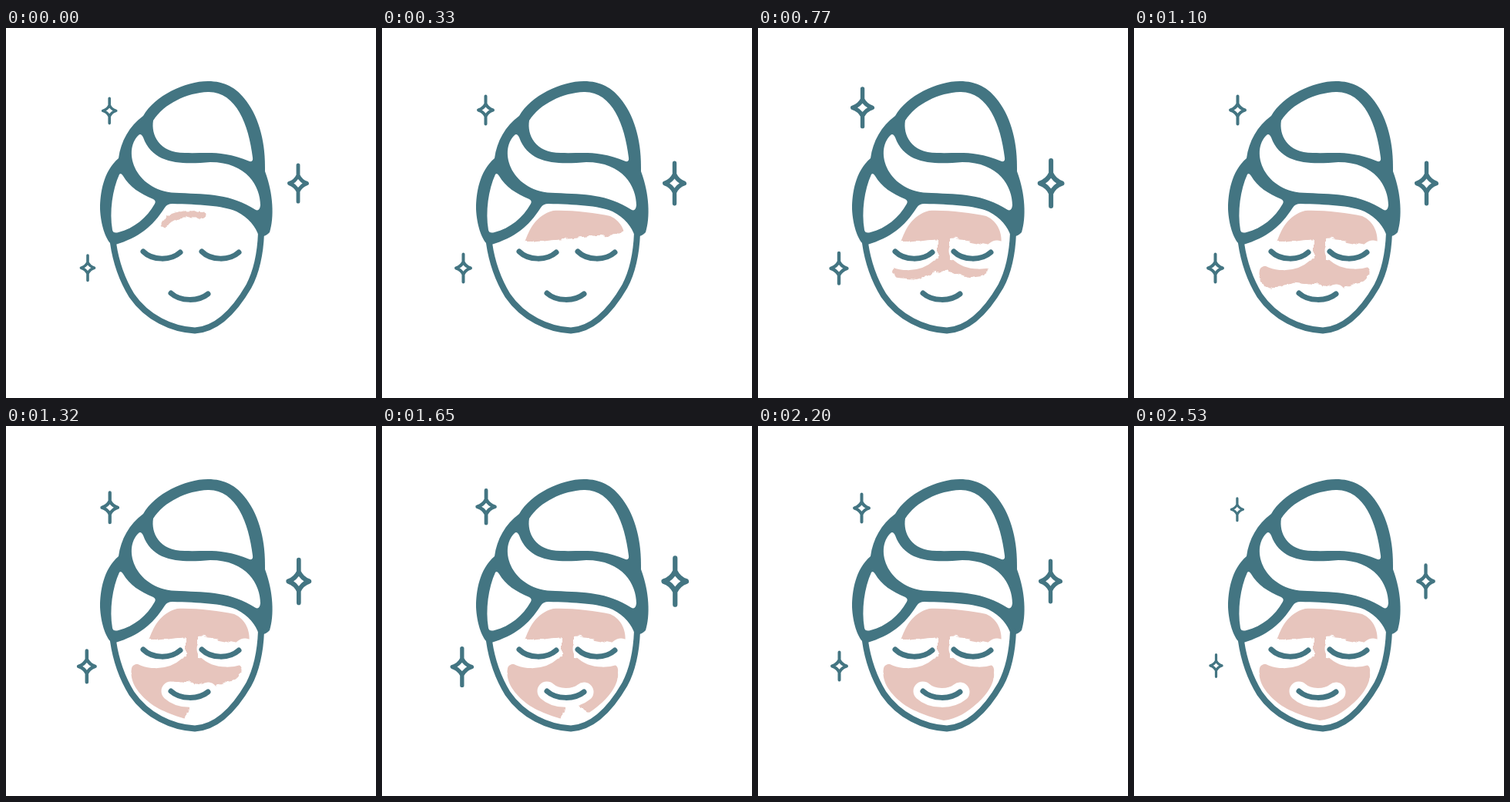
Recreate the animation shown at these times as an HTML page. Size 480 px wide and 480 px high, loop 2.64 s.

```html
<!DOCTYPE html>
<html lang="en">
<head>
<meta charset="utf-8">
<title>Face mask</title>
<style>
  html, body { margin: 0; width: 100%; height: 100%; overflow: hidden; background: #fff; }
  svg { display: block; width: 100%; height: 100%; }
  .line { fill: none; stroke: #437582; stroke-linecap: round; stroke-linejoin: round; }
  .wrap { fill: #437582; fill-rule: evenodd; }
  .cream { fill: #e7c5bd; }
  .brush { fill: none; stroke: #fff; stroke-linecap: round; stroke-linejoin: round; }
  .halo { fill: #000; stroke: #000; stroke-linecap: round; stroke-linejoin: round; }
  .star { fill: #fff; stroke: #437582; stroke-width: 4; stroke-linecap: round; stroke-linejoin: round; }
</style>
</head>
<body>
<svg viewBox="0 0 480 480">
  <defs>
    <path id="eye" d="M0 0C12 12 36 12 48 1"/>
    <path id="smile" d="M214 344C226 355 250 355 262 345"/>
    <filter id="ragged" filterUnits="userSpaceOnUse" x="0" y="0" width="480" height="480"
      color-interpolation-filters="sRGB">
      <feTurbulence type="fractalNoise" baseFrequency="0.12" numOctaves="2" seed="4"/>
      <feDisplacementMap in="SourceGraphic" scale="7" xChannelSelector="R" yChannelSelector="G"/>
    </filter>
    <!-- Brushed area, kept clear of eyes and mouth -->
    <mask id="painted" maskUnits="userSpaceOnUse" x="0" y="0" width="480" height="480">
      <g id="brushes" filter="url(#ragged)"></g>
      <g class="halo">
        <use href="#eye" x="170" y="291" stroke-width="28"/>
        <use href="#eye" x="262" y="289" stroke-width="29"/>
        <use href="#smile" fill="none" stroke-width="25"/>
      </g>
    </mask>
  </defs>

  <path class="cream" mask="url(#painted)" d="M185 278C191 262 199 243 222 237C245 236 276 240 296 244
    C312 251 318 268 315 284L298 309C305 309 307 314 306 320C308 334 294 352 284 360C272 371 258 380 241 382
    C220 377 196 368 184 357C170 345 160 331 163 314C165 308 172 308 178 310Z"/>

  <path class="wrap" d="M262 69C232 69 193 88 178 114C160 127 149 147 146 169C126 186 122 215 122 235
    C123 255 129 273 136 280L142 281C172 272 190 258 206 233Q209 228 216 228C250 229 280 230 299 238
    C315 246 324 258 328 270Q336 272 342 265C348 246 347 215 336 186C337 150 329 118 312 95
    C299 77 283 69 262 69Z
    M262 83C235 84 205 98 191 120C188 138 198 162 232 162C262 163 280 158 316 173Q321 174 320 168
    C315 125 298 82 262 83Z
    M172 139C150 160 168 214 225 214C265 216 290 215 324 236Q329 238 330 230C330 206 313 174 265 174
    C230 177 191 178 178 142Q175 136 172 139Z
    M147 190C138 210 134 238 138 262Q139 267 146 265C166 260 183 246 193 228Q195 224 191 222
    C174 215 160 206 152 192Q149 187 147 190Z"/>
  <g class="line">
    <path stroke-width="8" d="M139 279C142 300 149 324 163 347C183 376 215 391 245 392.500
      C273 391 297 366 315 335C325 316 330 292 331 266"/>
    <use href="#eye" x="178" y="290" stroke-width="7"/>
    <use href="#eye" x="254" y="290" stroke-width="7"/>
    <use href="#smile" stroke-width="7"/>
  </g>
  <g id="stars"></g>
</svg>
<script>
const STEP = 110, STEPS = 24;

function add(parent, attrs) {
  const el = document.createElementNS('http://www.w3.org/2000/svg', 'path');
  for (const k in attrs) el.setAttribute(k, attrs[k]);
  return document.getElementById(parent).appendChild(el);
}

// Brush strokes, each drawn between two steps
const strokes = [
  { from: -1, to: 0, width: 9, d: 'M206 254Q216 238 255 243' },
  { from: 0, to: 3, width: 28, d: 'M215 250L258 246L300 254L190 264L302 254' },
  { from: 3, to: 7, width: 16, d: 'M308 262L312 276L241 262V305L205 318L182 316L241 306L275 315L290 313' },
  { from: 7, to: 10, width: 21, d: 'M172 318L178 328L205 319L240 322L272 326L296 317' },
  { from: 10, to: 15, width: 30, d: 'M175 330L188 350L222 366L202 336L240 332L285 330L294 322L284 350L271 358' },
  { from: 15, to: 20, width: 40, d: 'M225 370L268 366L292 346' }
];
for (const s of strokes) {
  s.el = add('brushes', { class: 'brush', d: s.d, 'stroke-width': s.width, pathLength: 100 });
}

function paint(step) {
  for (const s of strokes) {
    const p = Math.min(1, (step - s.from) / (s.to - s.from));
    s.el.setAttribute('display', p > 0 ? 'inline' : 'none');
    s.el.setAttribute('stroke-dasharray', `${Math.max(0, p) * 100} 200`);
  }
}

// Each sparkle swells twice, then dips; it drifts a little with its size
const stars = [
  { x: 134.5, y: 106.500, w: 23, h: 40, swell: [0.35, 0.19], dx: 3, dy: -9 },
  { x: 379.5, y: 201.5, w: 31, h: 58, swell: [0.12, 0.15], dx: 5, dy: 0 },
  { x: 105.5, y: 311.5, w: 23, h: 40, swell: [0.1, 0.33], dx: -5, dy: 3 }
];
for (const s of stars) {
  s.el = add('stars', {
    class: 'star',
    d: 'M0 -18V-8Q-3 -2 -9.500 0Q-3 2 0 8V18V8Q3 2 9.500 0Q3 -2 0 -8Z'
  });
}

const bump = (t, a, peak, b) =>
  Math.max(0, Math.min((t - a) / (peak - a), (b - t) / (b - peak)));

function twinkle(step) {
  const t = (step + 21) % STEPS;
  for (const s of stars) {
    const grow = s.swell[0] * bump(t, 0, 4, 7) + s.swell[1] * bump(t, 7, 12, 17) - 0.2 * bump(t, 17, 20, 22);
    const k = 1 + grow;
    s.el.setAttribute('transform',
      `translate(${s.x + s.dx * grow} ${s.y + s.dy * grow}) scale(${k * s.w / 23} ${k * s.h / 40})`);
  }
}

function draw(ms) {
  const step = Math.floor(ms / STEP) % STEPS;
  paint(step);
  twinkle(step);
}

const begin = performance.now();
function tick() {
  draw(performance.now() - begin);
  requestAnimationFrame(tick);
}
draw(0);
requestAnimationFrame(tick);
</script>
</body>
</html>
```
